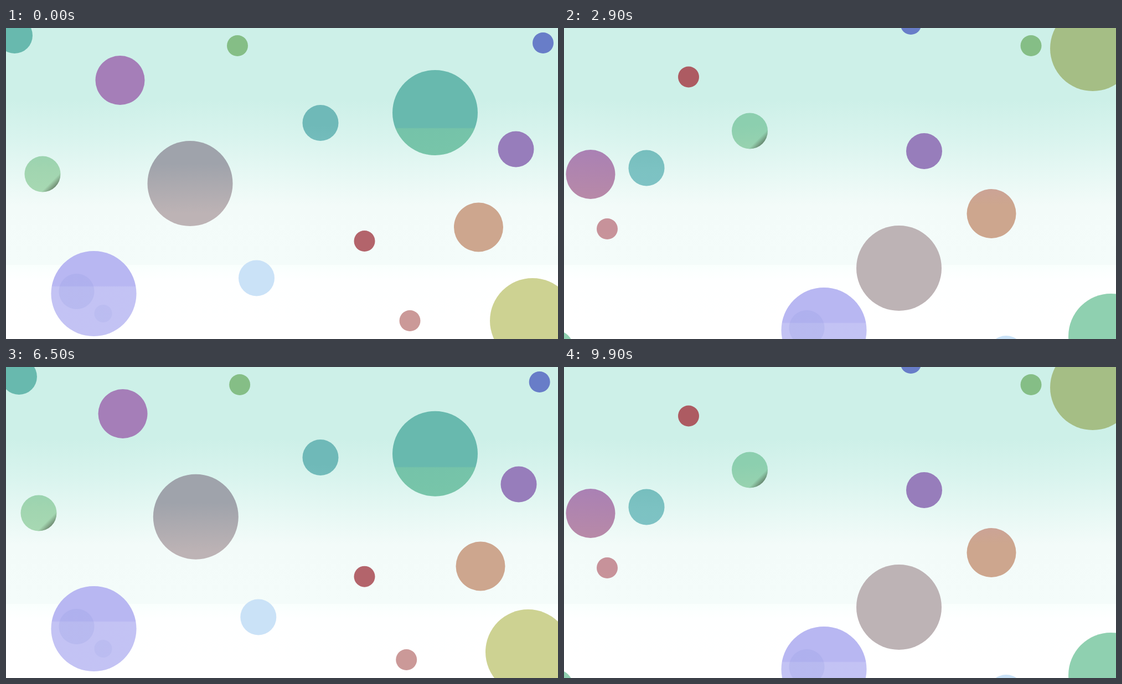
Recreate the animation shown at these times as an HTML page without scripts. Size 997 px wide and 562 px high, loop 10 s.

```html
<!DOCTYPE html>
<html lang="en">
<head>
<meta charset="utf-8">
<title>Drifting bubbles</title>
<style>
/* One clock drives all bubbles: 32 ticks out, 32 back, then out again. */
@property --t {
  syntax: "<number>";
  inherits: true;
  initial-value: 0;
}
@keyframes clock {
  0% { --t: 0; animation-timing-function: steps(32) }
  32% { --t: 32; animation-timing-function: steps(32) }
  64% { --t: 0; animation-timing-function: steps(32) }
  96% { --t: 32; animation-timing-function: steps(4) }
  100% { --t: 28 }
}
html, body { margin: 0; width: 100%; height: 100%; overflow: hidden }
body {
  position: relative;
  background: linear-gradient(#cdf0e8 130px, #d9f4ee 200px, #e7f8f4 265px, #f3fbf9 322px,
    #f4fcfa 428px, #f9fffd 428px, #feffff 455px, #fff 540px);
  animation: clock 10s -5ms infinite;
}

/* Legs: a = first drift, b = turn, c = short hop, d = long run. */
.b {
  --r: 32.5; --n: 10;
  --ax: 0; --ay: 0; --bx: 0; --by: 0; --cx: 0; --cy: 0; --dx: 0; --dy: 0;
  --p: clamp(0, var(--t) / var(--n), 1);
  --k1: calc(var(--p) * (.33 + var(--p) * (2.01 - 1.34 * var(--p))));
  --k2: clamp(0, (var(--t) - 10) / 10, 1);
  --k3: clamp(0, (var(--t) - 20) / 2, 1);
  --k4: max(0, (var(--t) - 22) / 7);
  --X: calc(var(--x) + var(--k1) * var(--ax) + var(--k2) * var(--bx) + var(--k3) * var(--cx) + var(--k4) * var(--dx));
  --Y: calc(var(--y) + var(--k1) * var(--ay) + var(--k2) * var(--by) + var(--k3) * var(--cy) + var(--k4) * var(--dy));
  position: absolute;
  left: 0;
  top: 0;
  width: calc(var(--r) * 2px);
  height: calc(var(--r) * 2px);
  margin: calc(var(--r) * -1px);
  border-radius: 50%;
  overflow: hidden;
  translate: calc(1px * var(--X)) calc(1px * var(--Y));
  /* the tint stays fixed to the stage while the bubble moves */
  background: linear-gradient(var(--tint)) 0 calc(1px * (var(--r) - var(--Y))) / 100% 700px no-repeat;
}
.one { --n: 20 }
.big { --r: 77 }
.mid { --r: 44.5 }
.tiny { --r: 19 }

.teal { --tint: #68b9ae 180px, #75c3a9 182px, #7cc8aa 317px, #8acead 319px, #8fd0b0 370px }
.olive { --tint: #a5be85 200px, #b4c588 260px, #b8c88c 320px, #cdd292 440px }
.lilac { --tint: #a1aaeb 245px, #b8b7f2 300px }
.plum { --tint: #a57eb8 190px, #b789a8 305px }
.aqua { --tint: #6fb9b8 175px, #7cc2c2 255px, #8ac5d2 480px }
.mint { --tint: #8ccfaf 175px, #a1d5b0 255px, #b5dfb8 390px }
.grey { --tint: #9fa3ab 245px, #bdb3b5 335px }
.red { --tint: #ad5b62 150px, #b3646b 350px }
.pink { --tint: #c7929a 365px, #cb9998 450px }
.tan { --tint: #cba396 290px, #cda68e 320px }
.leaf { --tint: #85be86, #85be86 }
.blue { --tint: #687dc8, #687dc8 }
.violet { --tint: #977dbb, #977dbb }
.sky { --tint: #cae2f7, #cae2f7 }

.lilac::before, .mint::before {
  content: "";
  position: absolute;
  inset: 0;
}
.lilac::before {
  background:
    radial-gradient(circle at 46px 73px, rgba(140, 150, 222, .2) 31.5px, transparent 32.5px),
    radial-gradient(circle at 94px 113px, rgba(140, 150, 222, .14) 15.5px, transparent 16.5px),
    linear-gradient(transparent 63px, rgba(255, 255, 255, .16) 65px);
}
.mint::before {
  background: linear-gradient(135deg, transparent 73%, rgba(70, 82, 66, .65) 87%);
}
</style>
</head>
<body>
<div class="b big olive" style="--x:951;--y:529;--ax:-154;--ay:-270;--bx:-249;--by:-21;--cx:168.5;--cy:-66.5;--dx:238.5;--dy:-134.5"></div>
<div class="b teal" style="--x:15;--y:13;--ax:154;--ay:77;--bx:28.5;--by:61;--cx:48.5;--cy:-53;--dx:-262;--dy:480"></div>
<div class="b big lilac" style="--x:158.5;--y:480;--ay:-135;--bx:-26;--by:-123;--cx:98;--cy:75;--dx:239;--dy:249"></div>
<div class="b big grey" style="--n:9;--x:332.5;--y:281;--ax:172.5;--ay:-172.5;--by:-88.5;--cy:-59;--dx:100;--dy:473"></div>
<div class="b big one teal" style="--x:775;--y:153;--ay:173;--cx:103;--cy:114;--dx:110;--dy:117"></div>
<div class="b mid plum" style="--x:205.5;--y:94;--ax:97;--ay:-193;--bx:-284.5;--by:51;--cx:9.5;--cy:82.5;--dx:20;--dy:229.5"></div>
<div class="b mid one tan" style="--x:853;--y:359.5;--ax:164.5;--cx:19.5;--cy:-2;--dx:-265.5;--dy:-22.5"></div>
<div class="b aqua" style="--x:567.5;--y:171;--ay:-154;--bx:-419;--by:585;--cy:-77.5;--dy:-272"></div>
<div class="b violet" style="--x:920.5;--y:218.5;--ax:97;--ay:-135;--bx:10;--by:-55.5;--cx:-58;--cy:201.5;--dx:-319.5;--dy:-7.5"></div>
<div class="b mint" style="--x:65.5;--y:263.5;--ax:-135;--bx:63.5;--by:151;--cx:49.5;--cy:-10.5;--dx:291.5;--dy:-218.5"></div>
<div class="b one sky" style="--x:452;--y:451.5;--ax:155;--cx:96.5;--cy:66.5;--dx:94.5;--dy:70"></div>
<div class="b tiny one leaf" style="--x:418;--y:32;--ax:193.5;--cx:54;--dx:178"></div>
<div class="b tiny one blue" style="--x:970;--y:27;--ax:-296;--cx:58;--cy:53;--dx:-105.5;--dy:-87"></div>
<div class="b tiny one red" style="--x:647.5;--y:385;--ay:-296.5;--cx:-85.5;--dx:-337"></div>
<div class="b tiny one pink" style="--x:729.5;--y:529;--ax:-295.5;--cx:-88;--cy:-37.5;--dx:-268;--dy:-128.5"></div>
</body>
</html>
```
